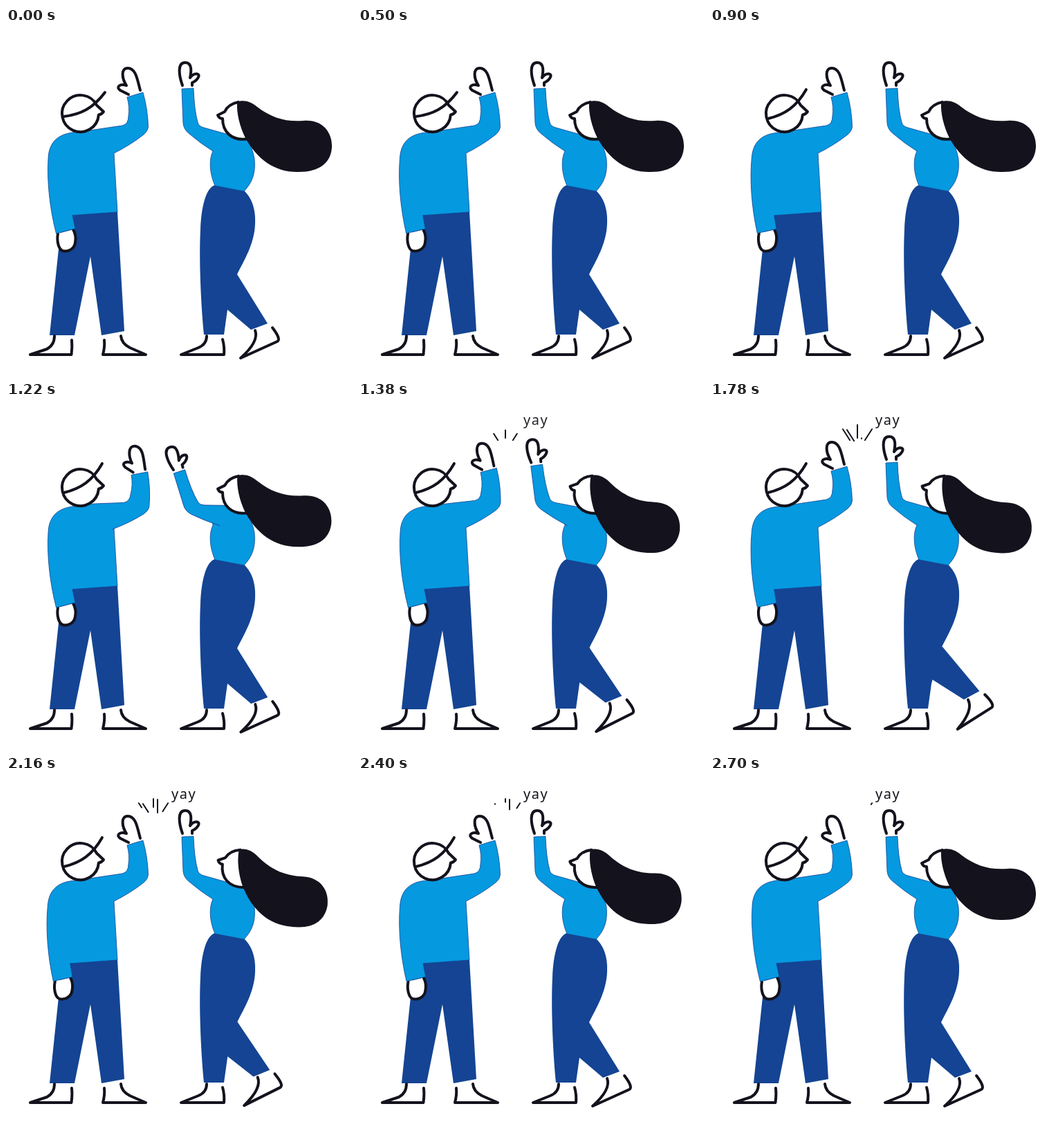
An HTML page that plays this animation: 500x500 px, repeating every 2720 ms.

```html
<!DOCTYPE html>
<html lang="en">
<head>
<meta charset="utf-8">
<title>High five</title>
<style>
  html, body { margin: 0; width: 100%; height: 100%; overflow: hidden; background: #fff; }
  svg { display: block; width: 100vw; height: 100vh; }
  .ink { fill: none; stroke: #14121c; stroke-width: 4; stroke-linecap: round; stroke-linejoin: round; }
  .skin { fill: #fff; }
  .pants { fill: #144493; }
  .shirt { fill: #0599e0; stroke: #144493; stroke-width: .8; }
  .hair { fill: #14121c; }
  #burst { stroke-width: 2; }
  text { font: 20px "Noto Sans", "Open Sans", sans-serif; letter-spacing: 1.6px; fill: #14121c; }
</style>
</head>
<body>
<svg viewBox="0 0 500 500">
  <!-- man -->
  <path class="pants" d="M80 265H161L171 438L138 444L122 330L99 444H63L77 310Z"/>
  <path class="ink" d="M70 445Q70 458 59 464Q50 467 35 472H94.500Q96 461 95 451"/>
  <path class="ink" d="M166 445Q167 456 179 462Q188 466 202 472H140Q143 461 142 451"/>
  <path class="shirt" d="M107 150L150 158L156 181L161 266L92 271L75 170"/>
  <g id="idleArm">
    <path class="ink skin" d="M75 297C73 308 76 320 82 322C90 324 99 319 100 310Q102 300 97 291"/>
    <path class="shirt" d="M107 150C78 151 62 162 61 189C59 220 63 260 72.500 297L100 290L96 270.500"/>
  </g>
  <g id="manArm">
    <path class="shirt" d="M107 150L168 141Q177 139 177 127Q179 115 175 100L198 93Q205 118 205.500 143Q205 149 199 154Q180 169 156 181"/>
    <path class="ink skin" d="M177 96L165 90C158 85 165 80 174 83C168 74 165 58 176 58C188 58 190 76 194 90"/>
  </g>
  <path class="ink skin" d="M131.200 111.800L141 121Q138 125 133.900 125.500A26.500 26.500 0 1 1 131.200 111.800"/>
  <path id="cap" class="ink" d="M83 128C108 125 126 116 143 93"/>

  <!-- woman -->
  <path class="ink" d="M290 445Q290 457 278 462L253 472H315Q316 461 313 450"/>
  <path class="pants" d="M302 227L344 235C358 248 361 268 360 283C359 312 344 336 334 356L320 407L315 443H286C281 390 279 330 281 291C282 262 288 231 302 227Z"/>
  <g id="kickLeg">
    <path class="pants" d="M334 356L378 427L354 436L300 390L310 340Z"/>
    <path class="ink" d="M360 437Q366 453 339 477L392 453Q398 450 385 433"/>
  </g>
  <path class="shirt" d="M296 160L299 178C293 190 294 210 302 228L344 236C356 223 361 210 359 189Q356 172 349 163L318 153"/>
  <g id="womanArm">
    <path class="shirt" d="M299 178Q280 166 265 153Q257 147 256 138L254 88L271 87Q272 118 277 136Q278 142 286 144L318 153"/>
    <path class="ink skin" d="M255 83C250 69 247 50 259 50C269 50 268 62 266 72C271 64 281 65 278 71Q276 76 269 79V83"/>
  </g>
  <g id="womanHead">
    <path class="ink skin" d="M336 107Q321 110 316 121L306 126Q308 131 313 131C313 150 326 164 350 160"/>
    <path class="hair" d="M334 107C342 103 354 106 363 114C384 130 404 136 430 134C457 132 471 150 471 171C470 195 453 208 423 208C390 209 363 191 345 157C338 142 333 124 334 107Z"/>
  </g>

  <path id="burst" class="ink"/>
  <text id="cheer" x="239" y="33">yay</text>
</svg>
<script>
const LOOP = 2720;
const IMPACT = 1280;
const $ = id => document.getElementById(id);

const ramp = (t, start, end) => {
  const u = Math.min(1, Math.max(0, (t - start) / (end - start)));
  return u * u * (3 - 2 * u);
};
const bell = (t, mid, half) =>
  Math.abs(t - mid) < half ? Math.cos((t - mid) / half * Math.PI / 2) ** 2 : 0;
const turn = (id, angle, x, y) =>
  $(id).setAttribute("transform", `rotate(${angle} ${x} ${y})`);

// A ray shoots out from the clap, then its tail catches up with its tip.
function ray(t, index, lag, x, y) {
  const angle = (index - 1) * Math.PI / 5.5;
  const tip = 20 + 19 * ramp(t, IMPACT + lag, IMPACT + lag + 180);
  const tail = 20 + 19 * ramp(t, IMPACT + lag + 500, 2450 + 250 * index);
  if (tip - tail < .5) return "";
  const at = r => `${x + r * Math.sin(angle)} ${y - r * Math.cos(angle)}`;
  return `M${at(tail)}L${at(tip)}`;
}

function burst(t) {
  let d = "";
  for (let i = 0; i < 3; i++) {
    d += ray(t, i, 0, 213, 72);
    if (i < 2) d += ray(t, i, 240 * (i + 1), 219, 73);
  }
  return d;
}

function draw(t) {
  const sway = ramp(t, 180, 700) - ramp(t, 900, 1220) + ramp(t, 1380, 1780) - ramp(t, 2160, 2700);
  const clap = 1.6 * bell(t, IMPACT, 145);
  const toss = ramp(t, 1170, 1410) - ramp(t, 2160, 2700);

  turn("idleArm", 1.8 * sway, 85, 165);
  turn("cap", -7 * ramp(t, 700, 860), 108, 124);
  turn("manArm", 6 * clap, 128, 160);
  turn("womanArm", -14.5 * clap, 306, 140);
  turn("womanHead", 7.2 * toss, 340, 128);
  turn("kickLeg", -8 * bell(t, 1770, 600), 318, 341);

  $("burst").setAttribute("d", burst(t));
  $("cheer").setAttribute("opacity", ramp(t, IMPACT, 1400));
}

function tick() {
  draw(performance.now() % LOOP);
  requestAnimationFrame(tick);
}
tick();
</script>
</body>
</html>
```
